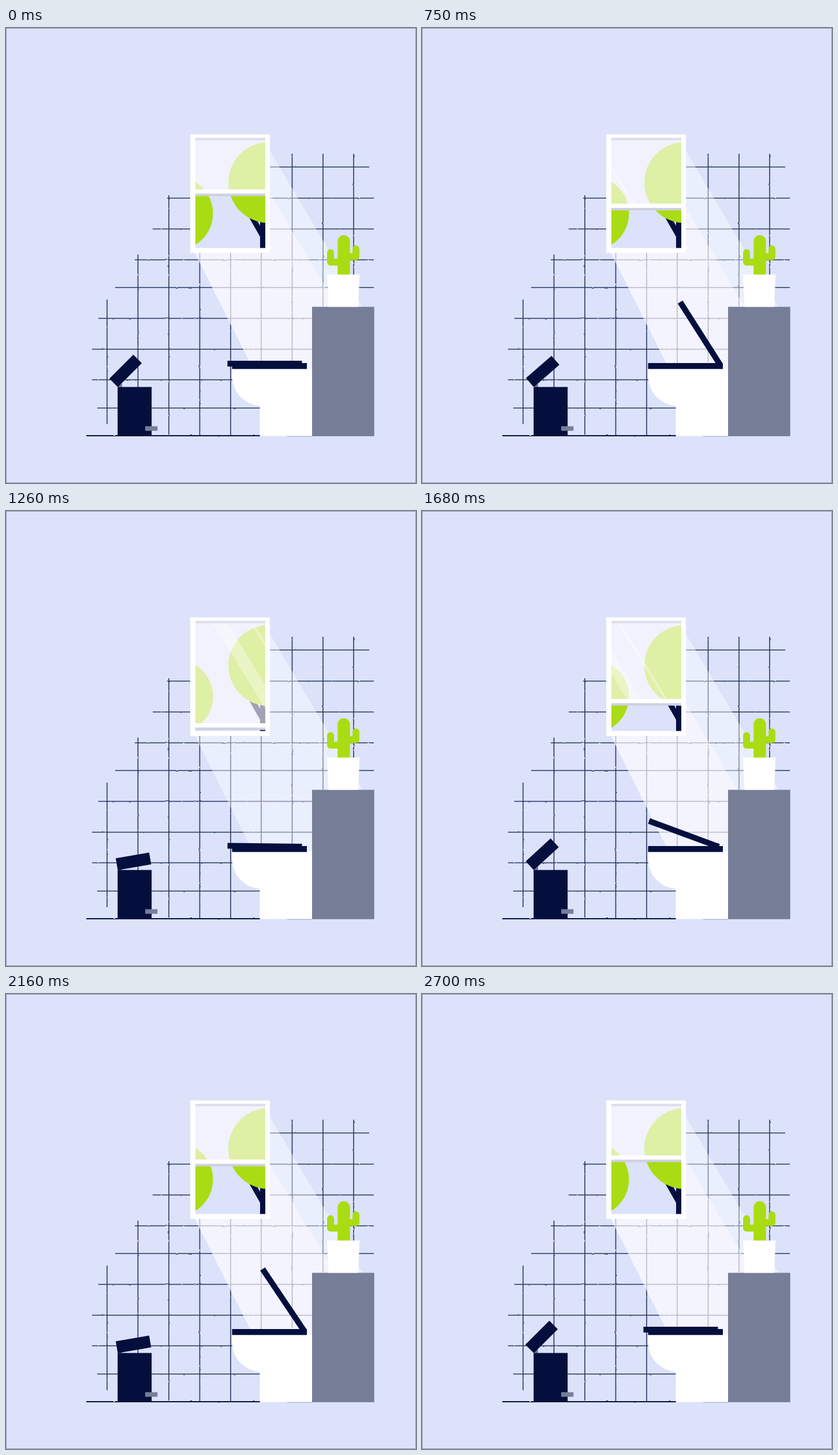
These frames come from a looping animation (710 by 789 pixels, 2.73 s). An HTML page:

```html
<!DOCTYPE html>
<html lang="en">
<head>
<meta charset="utf-8">
<title>Bathroom</title>
<style>
  html, body { margin: 0; width: 100%; height: 100%; overflow: hidden; background: #dbe2fa; }
  svg { display: block; width: 100vw; height: 100vh; }
  .navy { fill: #050f3d; }
  .lime { fill: #aadc14; }
  .grey { fill: #777e97; }
  .white { fill: #fff; }
  .shade { fill: #cfd0e1; }
  .grid { fill: none; stroke: #050f3d; stroke-width: 1.6; stroke-opacity: .82; }
  .cactus { fill: none; stroke: #aadc14; stroke-width: 12; stroke-linecap: round; stroke-linejoin: round; }
</style>
</head>
<body>
<svg viewBox="0 0 710 789" preserveAspectRatio="none">
  <defs>
    <filter id="rough" filterUnits="userSpaceOnUse" x="0" y="0" width="710" height="789">
      <feTurbulence type="fractalNoise" baseFrequency=".12" numOctaves="2" seed="4"/>
      <feDisplacementMap in="SourceGraphic" scale="2" xChannelSelector="R" yChannelSelector="G"/>
    </filter>
    <clipPath id="pane"><rect x="328" y="190" width="121" height="192"/></clipPath>
    <clipPath id="glassClip"><rect id="glassBox" x="328" y="194" width="121" height="86"/></clipPath>
  </defs>

  <rect width="710" height="789" fill="#dbe2fa"/>

  <!-- tiles and floor -->
  <g filter="url(#rough)">
    <path class="grid" d="M175 471V687M228.5 393V707M282 290V705M335.5 388V707M389 388V707M442 388V660
      M495.5 218V580M549 218V483M602 218V483M457 241H629M279 295H637M254 348.5H637M223 402H637
      M189 450H637M159 503.5H530M149 557H530M149 610H395M158 659H440"/>
    <path d="M139 707H440" stroke="#050f3d" stroke-width="2.2"/>
  </g>
  <path d="M487 708H530" stroke="#8b91ab" stroke-width="1"/>

  <!-- light -->
  <path d="M457 213L617 483V590H427L327 390H457Z" fill="#fff" fill-opacity=".42"/>
  <path id="beam" fill="#fffaff" fill-opacity=".42"/>

  <!-- window -->
  <g clip-path="url(#pane)">
    <rect x="328" y="190" width="121" height="192" fill="#dbe2fa"/>
    <path class="navy" d="M440 330H449V382H440V362L419 325H430L440 343Z"/>
    <circle class="lime" cx="455" cy="268" r="70"/>
    <circle class="lime" cx="294.5" cy="321.5" r="64"/>
    <g clip-path="url(#glassClip)">
      <rect x="328" y="194" width="121" height="190" fill="#fffcff" fill-opacity=".62"/>
      <path id="sheen" fill="#fff" fill-opacity=".33"
        d="M-68 195H-43L75 388H50ZM-2.5 195H2.5L120.500 388H115.500Z"/>
    </g>
    <rect x="328" y="190" width="121" height="4.500" fill="#dcddec"/>
    <g id="sash">
      <rect class="shade" x="328" y="286" width="121" height="5.500"/>
      <rect class="white" x="328" y="279.500" width="121" height="7.700"/>
    </g>
  </g>
  <path class="white" fill-rule="evenodd" d="M319 184.500H457V390H319ZM328 190.500V381.500H449V190.500Z"/>

  <!-- toilet -->
  <path class="white" d="M391.500 590H531V707.500H439.500V655C412 653 391.500 631 391.500 603Z"/>
  <rect class="navy" x="391.500" y="581" width="129.500" height="10.300"/>
  <rect id="seat" class="navy" x="383.500" y="577" width="129" height="10"/>

  <!-- cabinet and cactus -->
  <rect class="grey" x="530" y="483.500" width="107.700" height="224.300"/>
  <g class="cactus">
    <path d="M585 370V428" stroke-width="21.500" stroke-linecap="round"/>
    <path d="M562 389.500V406H580M606 383V396.500H590"/>
  </g>
  <path class="white" d="M556 427.500H612.300L610 483.500H558.500Z"/>

  <!-- bin -->
  <rect class="grey" x="195" y="617" width="6" height="7"/>
  <rect class="navy" x="193.300" y="622.500" width="58.900" height="84.800"/>
  <rect id="lid" class="navy" x="193.500" y="602" width="58.700" height="20.700"/>
  <rect class="grey" x="241" y="690.500" width="21.300" height="8"/>

  <rect x=".5" y=".5" width="709" height="788" fill="none" stroke="#8b92ac"/>
</svg>
<script>
  const FRAME = 30, COUNT = 91;
  const el = id => document.getElementById(id);
  const [beam, sash, sheen, glassBox, seat, lid] =
    ['beam', 'sash', 'sheen', 'glassBox', 'seat', 'lid'].map(el);

  // Cubic bezier easing with control points (a, 0) and (b, 1).
  const ease = (a, b) => x => {
    let lo = 0, hi = 1, s = .5;
    for (let i = 0; i < 24; i++) {
      s = (lo + hi) / 2;
      const r = 1 - s;
      if (3 * r * r * s * a + 3 * r * s * s * b + s * s * s < x) lo = s; else hi = s;
    }
    return s * s * (3 - 2 * s);
  };
  const slideDown = ease(.79, .7), slideUp = ease(.28, .05);
  const swing = ease(.77, .3), flap = ease(.74, .72);

  // Rises to 1 at the peak and returns along the same curve.
  const bounce = (f, period, peak, curve) => {
    const p = f % period;
    return curve(p < peak ? p / peak : (period - p) / (period - peak));
  };

  function draw(f) {
    const drop = 90 * (f < 45 ? slideDown(f / 45) : 1 - slideUp((f - 45) / 45));
    const bar = 279.5 + drop, edge = bar + 8;
    sash.setAttribute('transform', `translate(0 ${drop})`);
    glassBox.setAttribute('height', bar - 194);
    sheen.setAttribute('transform', `translate(${250 + 2 * drop} 0)`);
    beam.setAttribute('d', `M457 ${edge}L${457 + (590 - edge) / 1.68} 590H427L327 390H457Z`);
    beam.setAttribute('opacity', Math.max(0, Math.min(1, (86 - drop) / 24)));
    seat.setAttribute('transform', `rotate(${58 * bounce(f, 45, 22.8, swing)} 512.5 586.5)`);
    lid.setAttribute('transform', `rotate(${45 * bounce(f, 30, 15, flap) - 45} 193.5 622.5)`);
  }

  const start = performance.now();
  function tick() {
    draw(Math.floor((performance.now() - start) / FRAME) % COUNT);
    requestAnimationFrame(tick);
  }
  tick();
</script>
</body>
</html>
```
